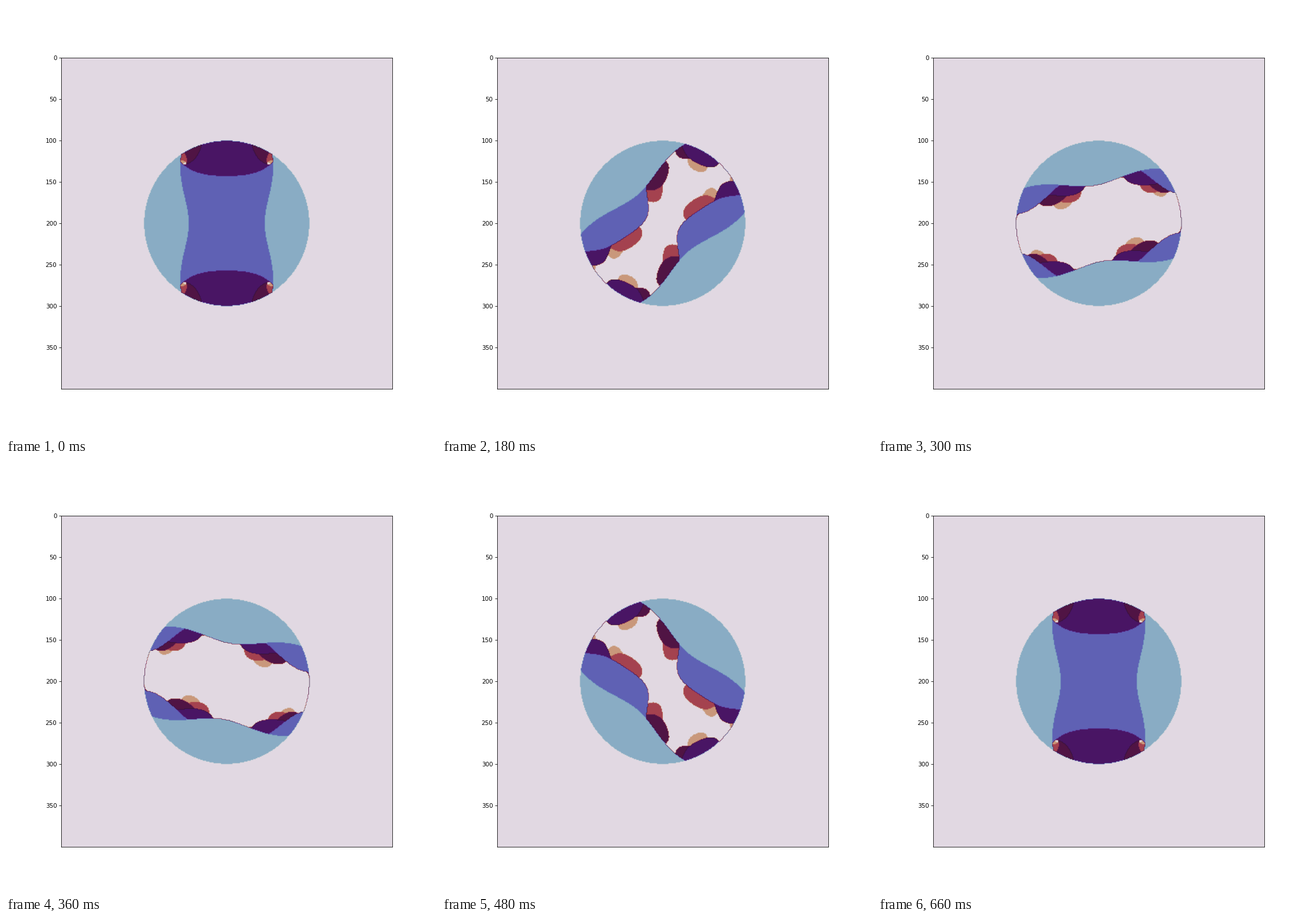
A matplotlib script that plays this animation: 748x748 px, repeating every 0.69 s.

```python
import numpy as np
import matplotlib.pyplot as plt
from matplotlib.animation import FuncAnimation

SIZE, INCHES = 748, 10
FRAMES, INTERVAL = 23, 30
GRID, FINE, MAX_ITER = 400, 770, 7
RADIUS = 0.7885

axis = np.linspace(-2, 2, GRID)
plane = axis[None, :] + 1j * axis[:, None]
angles = np.linspace(0, 2 * np.pi, FRAMES)
cmap = plt.get_cmap("twilight")


def hann_weights(n_out, n_in):
    """Matrix that resamples n_in cells to n_out with a raised-cosine kernel."""
    pos = (np.arange(n_out) + 0.5) * n_in / n_out - 0.5
    dist = np.abs(pos[:, None] - np.arange(n_in))
    w = 0.5 + 0.5 * np.cos(np.pi * np.minimum(dist, 1))
    return w / w.sum(axis=1, keepdims=True)


weights = hann_weights(FINE, GRID)


def julia(c):
    """Count how many iterates of z -> z^2 + c stay inside the unit circle."""
    z = plane.copy()
    alive = np.ones(z.shape, bool)
    count = np.zeros(z.shape)
    for _ in range(MAX_ITER):
        alive &= np.abs(z) <= 1
        count[alive] += 1
        z[alive] = z[alive] ** 2 + c
    return count


def picture(i):
    count = julia(RADIUS * np.exp(1j * angles[i]))
    smooth = weights @ count @ weights.T
    return cmap(smooth / MAX_ITER, bytes=True)[..., :3]


def update(i):
    image.set_data(picture(i))
    return [image]


fig, ax = plt.subplots(figsize=(INCHES, INCHES), dpi=SIZE / INCHES)
fig.subplots_adjust(left=0.1255, right=0.9005)
image = ax.imshow(picture(0), extent=(-0.5, GRID - 0.5, GRID - 0.5, -0.5))
ax.set_xticks([])

anim = FuncAnimation(fig, update, frames=FRAMES, interval=INTERVAL,
                     repeat=True, repeat_delay=0)
plt.show()
```
